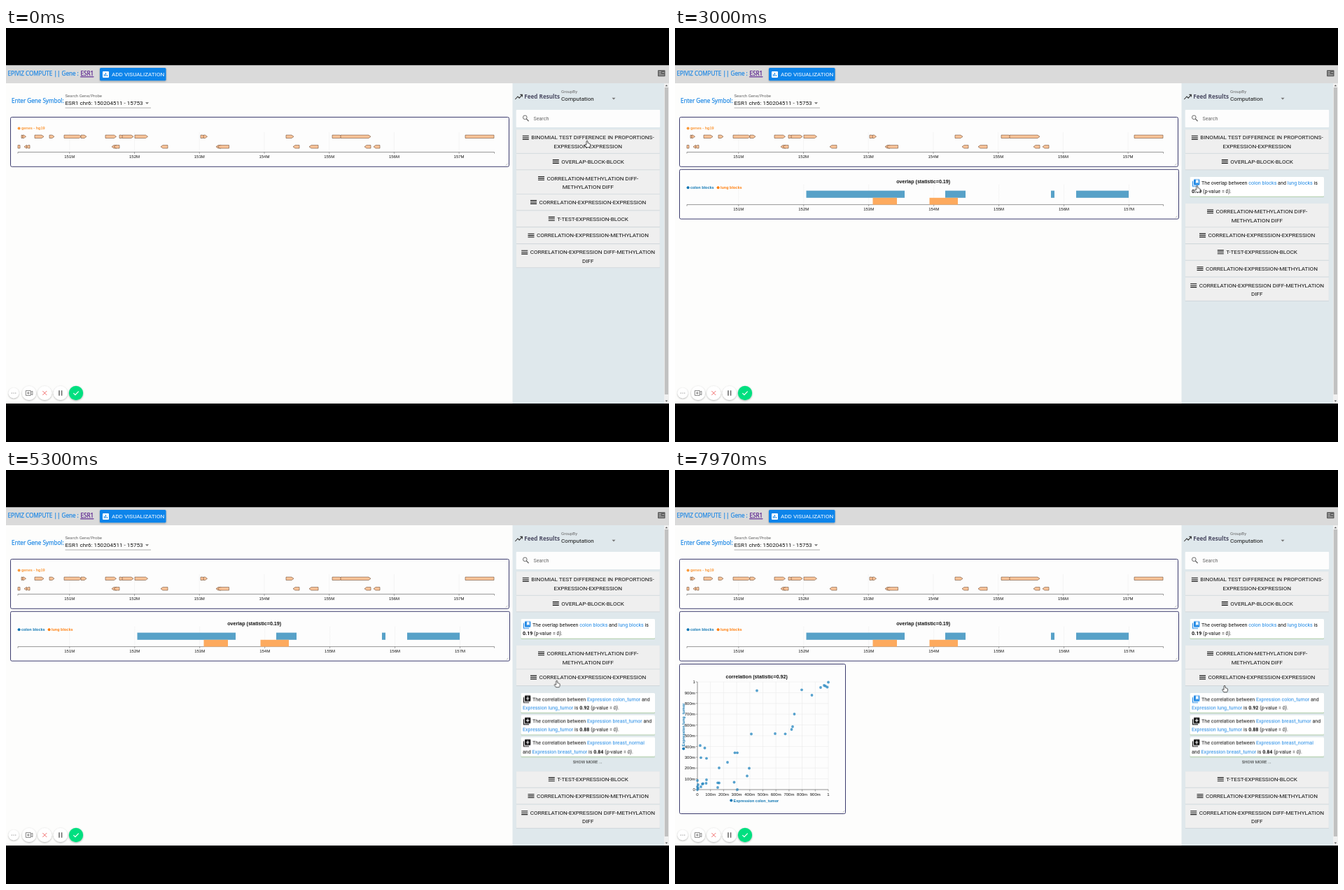
Recreate the animation shown at these times as an HTML page. Size 947 by 592 pixels, loop 8000 ms.

```html
<!DOCTYPE html>
<html lang="en">
<head>
<meta charset="utf-8">
<title>Gene feed results</title>
<style>
html, body { margin: 0; width: 100%; height: 100%; overflow: hidden; background: #000; }
svg { display: block; width: 100vw; height: 100vh; }
text { font-family: Roboto, sans-serif; font-size: 8.12px; fill: #111; white-space: pre; }
.small { font-size: 6.08px; fill: #666; }
.body { font-size: 7.11px; }
.head { font-family: "Open Sans", sans-serif; fill: #1e88e5; stroke: #1e88e5; stroke-width: .25px; }
.plot { font-family: "Liberation Sans", Arial, sans-serif; font-size: 6px; }
.title { font-size: 7.11px; font-weight: bold; }
.legend { font-size: 5.52px; font-weight: bold; }
.mid { text-anchor: middle; }
.end { text-anchor: end; }
.link { fill: #1e88e5; }
.b { font-weight: bold; }
.i { font-style: italic; }
.frame { fill: #fdfdfd; stroke: #3c3c6e; }

.shift1, .shift2, .open1, .open2, .ripple, .show1, .hide1, .show2, .hide2, #hand {
  animation-duration: 8s; animation-iteration-count: infinite; }
.shift1, .shift2, .open1, .open2 { animation-timing-function: ease; }
.show1, .hide1, .show2, .hide2 { animation-timing-function: step-end; }
.shift1 { animation-name: shift1; }
.shift2 { animation-name: shift2; }
.open1 { animation-name: open1; transform-origin: 0 203px; }
.open2 { animation-name: open2; transform-origin: 0 260.5px; }
.show1 { animation-name: show1; }
.hide1 { animation-name: hide1; }
.show2 { animation-name: show2; }
.hide2 { animation-name: hide2; }
#rip1 { animation-name: rip1; }
#rip2 { animation-name: rip2; }
#hand { animation-name: hand; animation-timing-function: ease-in-out; }

@keyframes shift1 { 0%, 13.7% { transform: translateY(0); } 17.45%, 100% { transform: translateY(47.5px); } }
@keyframes open1 { 0%, 13.7% { transform: scaleY(0); } 17.45%, 100% { transform: scaleY(1); } }
@keyframes shift2 { 0%, 56.61% { transform: translateY(0); } 60.36%, 100% { transform: translateY(122px); } }
@keyframes open2 { 0%, 56.61% { transform: scaleY(0); } 60.36%, 100% { transform: scaleY(1); } }
@keyframes show1 { 0% { opacity: 0; } 32.5%, 100% { opacity: 1; } }
@keyframes hide1 { 0% { opacity: 1; } 32.5%, 100% { opacity: 0; } }
@keyframes show2 { 0% { opacity: 0; } 85%, 100% { opacity: 1; } }
@keyframes hide2 { 0% { opacity: 1; } 85%, 100% { opacity: 0; } }
@keyframes rip1 {
  0%, 11.9% { transform: scale(0); opacity: .25; }
  14.1%, 14.7% { transform: scale(1); opacity: .25; }
  18.7%, 100% { transform: scale(1); opacity: 0; }
}
@keyframes rip2 {
  0%, 55.4% { transform: scale(0); opacity: .25; }
  57.8%, 58.4% { transform: scale(1); opacity: .25; }
  62.4%, 100% { transform: scale(1); opacity: 0; }
}
@keyframes hand {
  0%, 5% { transform: translate(830px, 161px); }
  10%, 18.75% { transform: translate(840px, 189px); }
  26.25%, 36.25% { transform: translate(745px, 225px); }
  43.5%, 46.25% { transform: translate(756px, 228px); }
  54.4%, 61.9% { transform: translate(803px, 292px); }
  73.75%, 87.5% { transform: translate(745px, 323.5px); }
  97.5%, 100% { transform: translate(785px, 308px); }
}
</style>
</head>
<body>
<svg viewBox="0 0 947 592">
  <defs>
    <clipPath id="clip1"><rect class="open1" x="725" y="203" width="212" height="47.5"/></clipPath>
    <clipPath id="clip2"><rect class="open2" x="725" y="260.5" width="212" height="122"/></clipPath>
    <clipPath id="btn1"><rect x="729" y="180" width="205" height="23"/></clipPath>
    <clipPath id="btn2"><rect x="729" y="238" width="205" height="23"/></clipPath>
    <filter id="soft" x="-30%" y="-30%" width="160%" height="170%">
      <feDropShadow dx="0" dy=".8" stdDeviation=".9" flood-opacity=".35"/>
    </filter>
  </defs>

  <rect width="947" height="592"/>
  <rect y="53.5" width="947" height="483.5" fill="#fdfdfc"/>
  <rect y="53.5" width="947" height="25.5" fill="#dadada"/>

  <!-- header -->
  <text class="head" x="2.5" y="68.4">EPIVIZ COMPUTE || Gene : </text>
  <text class="head" x="106.5" y="68.4" style="fill:#551a8b;stroke:#551a8b" text-decoration="underline">ESR1</text>
  <rect x="134" y="57" width="94.5" height="18.3" rx="1.5" fill="#0b84ea" filter="url(#soft)"/>
  <rect x="138" y="62" width="9" height="9" rx="1" fill="#fff"/>
  <path d="M140.4 69v-3M142.5 69v-5M144.6 69v-1.8" stroke="#0b84ea" stroke-width="1.1"/>
  <text x="151" y="68.8" style="fill:#fff">ADD VISUALIZATION</text>
  <rect x="931" y="60.3" width="10.5" height="9" rx=".8" fill="#5c5c5c"/>
  <path d="M932.3 62.6h3.6M932.3 64.8h3.6M932.3 67h7.8M937.2 63.7h3" stroke="#ccc" stroke-width=".9"/>

  <!-- gene search -->
  <text class="head" x="8" y="107">Enter Gene Symbol:</text>
  <text class="small" x="84.5" y="98.6">Search Gene/Probe</text>
  <text x="84.5" y="109.8">ESR1 chr6: 150204511 - 15753</text>
  <path d="M84.5 114.2h122.5M793 107.6h81" stroke="#777" stroke-width=".6"/>
  <path d="M199 106.3h5l-2.5 2.6z" fill="#777"/>

  <g id="genes"></g>
  <g id="overlap" class="show1"></g>
  <g id="scatter" class="show2"></g>

  <!-- recorder controls -->
  <g filter="url(#soft)" fill="#fff">
    <circle cx="11" cy="522" r="7.3"/><circle cx="33" cy="522" r="10"/><circle cx="55.3" cy="522" r="10"/>
    <circle cx="77.8" cy="522" r="10"/><circle cx="100" cy="522" r="10.2" fill="#00df80"/>
  </g>
  <g fill="none" stroke="#666">
    <path d="M8.3 522h.1M11 522h.1M13.7 522h.1" stroke-width="1.1" stroke-linecap="round"/>
    <path d="M28.3 518.6h7v6.8h-7zM35.3 521l2.6-1.7v5.4l-2.6-1.7M30 522h3.6M31.8 520.2v3.6" stroke-width=".8"/>
    <path d="M52.3 519l6 6m0-6l-6 6" stroke="#f06060" stroke-width=".9"/>
    <path d="M76 518.3v7.4M79.6 518.3v7.4" stroke-width="1.5"/>
    <path d="M96.4 522.2l2.5 2.5 4.8-5" stroke="#fff" stroke-width="1.2"/>
  </g>

  <!-- side panel -->
  <rect x="723.5" y="79" width="216.5" height="458" fill="#dfe8ec"/>
  <rect x="940" y="79" width="7" height="458" fill="#f0f0f0"/>
  <rect x="940.8" y="85" width="5.2" height="439" fill="#c1c1c1"/>
  <path d="M941.6 83.2h3.6l-1.8-2zM941.6 532.4h3.6l-1.8 2z" fill="#555"/>
  <path d="M727.3 102l3.7-4 2.2 2.2 4-4.5M734.4 95.4h3v3" fill="none" stroke="#333" stroke-width="1.1"/>
  <text class="head b" x="740.3" y="100.8" style="fill:#4b4b63;stroke:none">Feed Results</text>
  <text class="small" x="793" y="92.6">GroupBy</text>
  <text x="793" y="103.8">Computation</text>
  <path d="M865.5 99.8h5l-2.5 2.6z" fill="#777"/>
  <rect x="728.7" y="117" width="205.5" height="25" rx="1" fill="#fdfdfd"/>
  <circle cx="741.3" cy="127.8" r="2.8" fill="none" stroke="#666"/>
  <path d="M743.4 130l3.2 3.2" stroke="#666" stroke-width="1.3"/>
  <text class="body" x="753.5" y="131.7" style="fill:#666">Search</text>
  <g id="feed"></g>

  <g id="hand">
    <path d="M-1 .9Q0-.6 1 .9V3.6Q2 3 2.5 4 3.6 3.6 3.7 4.7 4.6 4.6 4.5 5.6V7.3L3.5 9.7H-1.2L-3.4 6.3Q-3.2 5-1.9 5.6L-1 6.4Z" fill="#fff" stroke="#222" stroke-width=".75"/>
  </g>
</svg>
<script>
const $ = id => document.getElementById(id);
const NS = 'http://www.w3.org/2000/svg';

function add(parent, tag, attrs = {}, content = '') {
  const node = document.createElementNS(NS, tag);
  for (const key in attrs) node.setAttribute(key, attrs[key]);
  if (content) node.innerHTML = content;
  parent.append(node);
  return node;
}
const label = (parent, x, y, content, cls = '') => add(parent, 'text', { x, y, class: cls }, content);
const box = (parent, x, y, width, height, attrs) => add(parent, 'rect', { x, y, width, height, ...attrs });
const path = (parent, d, stroke, width = 1, attrs = {}) =>
  add(parent, 'path', { d, fill: 'none', stroke, 'stroke-width': width, ...attrs });

function legend(parent, x, y, text, color) {
  add(parent, 'circle', { cx: x, cy: y - 2, r: 2, fill: color });
  label(parent, x + 3.3, y, text, 'plot legend').style.fill = color;
}

function track(parent, width, top, axisY, step) {
  box(parent, 6.5, top, width, 70.8, { rx: 2, class: 'frame' });
  path(parent, `M${width + 2} ${top + 69}l2.8-2.8`, '#888', .6);
  for (let i = 0; i < 7; i++) {
    const x = 90.8 + i * step;
    path(parent, `M${x} ${top + 22}V${axisY}`, '#e2e2e2', .6, { 'stroke-dasharray': '1 1' });
    path(parent, `M${x} ${axisY}v2.5`, '#555', .5);
    label(parent, x, axisY + 8.8, 151 + i + 'M', 'plot mid');
  }
  path(parent, `M17 ${axisY + 2}V${axisY}H697.5v2`, '#555', .6);
}

// Gene track: [start, end] in pixels, arrow tip on the strand's side
const genes = $('genes');
track(genes, 712, 127.5, 177.5, 92.72);
legend(genes, 18.6, 145.4, 'genes - hg19', '#fb9a3c');
const forward = [[22, 26], [24, 28.5], [41, 54], [62, 69], [83, 107.5], [107, 115], [142, 157.5], [162, 168],
  [166, 182], [184, 202.5], [278, 284], [282, 287.5], [400, 411], [466, 480], [478, 521]];
const reverse = [[26, 30], [29, 34], [151, 158], [154, 162], [221, 231], [300, 307], [302.5, 318.5],
  [410, 419], [433, 446], [512, 521], [525, 534]];
const geneStyle = { fill: '#ffc193', 'fill-opacity': .95 };
const arrow = (from, to, y) => {
  const neck = to - Math.sign(to - from) * 3;
  path(genes, `M${from} ${y - 2.2}H${neck}L${to} ${y}L${neck} ${y + 2.2}H${from}Z`, '#6b4d38', .6, geneStyle);
};
forward.forEach(([a, b]) => arrow(a, b, 155.3));
reverse.forEach(([a, b]) => arrow(b, a, 169.8));
path(genes, 'M656 153.1h41v4.4h-41zM17 167.6h3v4.4h-3z', '#6b4d38', .6, geneStyle);

// Overlap track
const overlap = $('overlap');
track(overlap, 713, 202.3, 252.6, 92.95);
label(overlap, 354.7, 222.2, 'overlap (statistic=0.19)', 'plot title mid');
legend(overlap, 18.6, 230.2, 'colon blocks', '#1278b4');
legend(overlap, 61.6, 230.2, 'lung blocks', '#ff7f0e');
[[187.5, 328], [386, 415], [537, 542], [573, 648]].forEach(([a, b]) =>
  box(overlap, a, 232.6, b - a, 10.2, { fill: '#57a1c8' }));
[[282.5, 317], [363.5, 404]].forEach(([a, b]) =>
  box(overlap, a, 242.8, b - a, 9.8, { fill: '#fdaa5e' }));

// Correlation scatter
const scatter = $('scatter');
box(scatter, 6.5, 277.5, 237, 214, { rx: 2, class: 'frame' });
path(scatter, 'M239.5 490l2.8-2.8', '#888', .6);
label(scatter, 116.7, 298, 'correlation (statistic=0.92)', 'plot title mid');
for (let i = 0; i <= 10; i++) {
  const x = 32 + i * 18.7, y = 457 - i * 15.4;
  const name = i === 10 ? '1' : i ? i + '00m' : '0';
  path(scatter, `M${x} 303V457M32 ${y}H219`, '#e6e6e6', .5);
  path(scatter, `M${x} 457v2.5M32 ${y}h-2.5`, '#555', .5);
  label(scatter, x, 466, name, 'plot mid');
  label(scatter, 28.8, y + 2.1, name, 'plot end');
}
path(scatter, 'M32 303V457H219', '#555', .6);
legend(scatter, 80.3, 474.6, 'Expression colon_tumor', '#1278b4');
legend(add(scatter, 'g', { transform: 'translate(14.2 398.5) rotate(-90)' }), 0, 0, 'Expression lung_tumor', '#1278b4');
const points = [[219, 303.5], [213, 308], [217.5, 310.5], [208, 311], [215, 309], [181, 314.3], [195.5, 322],
  [117, 315.5], [170.5, 349], [168, 367], [166.5, 371], [157.5, 377.3], [143, 377], [109, 377.5], [36, 394],
  [42.5, 397.5], [37, 411.3], [45, 412.3], [85.5, 404.3], [89, 404.3], [75, 418], [63, 426], [106, 426.5],
  [103, 437.5], [45, 443], [44.5, 448], [61, 447.3], [63, 447.5], [61, 454], [84.5, 446.5], [89, 457],
  [39, 449], [37, 453], [40, 448.5], [32, 444], [33, 450], [32, 453], [33, 455], [32, 457]];
points.forEach(([cx, cy]) => add(scatter, 'circle', { cx, cy, r: 1.9, fill: '#1f83bd', 'fill-opacity': .75 }));

// Feed list
const feed = $('feed');
function item(parent, top, height, x, first, second) {
  box(parent, 728.8, top + .4, 205, height, { fill: '#c9d0d4' });
  box(parent, 728.8, top, 205, height - .3, { fill: '#efefef' });
  const y = top + (second ? 14.2 : 13.9);
  path(parent, [-5.1, -2.7, -.3].map(dy => `M${x - 12.5} ${y + dy}h9`).join(''), '#111', 1.1);
  label(parent, x, y, first);
  if (second) label(parent, 831.3, y + 12.4, second, 'mid');
}

function ripple(parent, id, clip, x, y) {
  const holder = add(parent, 'g', { 'clip-path': `url(#${clip})` });
  add(holder, 'circle', { id, class: 'ripple', cx: x, cy: y, r: 126, style: `transform-origin:${x}px ${y}px` });
}

function icon(parent, y, color, mark, cls) {
  const g = add(parent, 'g', { transform: `translate(744 ${y})`, class: cls });
  path(g, 'M-4.5-2.8v7.6h7.6', color, 1.1);
  box(g, -3, -5.2, 8.3, 8.3, { rx: .8, fill: color });
  path(g, mark, '#fff', 1.1, mark.endsWith('z') ? { fill: '#fff', 'stroke-width': .3 } : {});
}

function card(parent, top, lines, step = '') {
  box(parent, 735.5, top + .8, 191.5, 28.3, { rx: 1.5, fill: '#b9d3b5' });
  box(parent, 735.5, top, 191.5, 27.7, { rx: 1.5, fill: '#fff' });
  icon(parent, top + 8.6, '#111', 'M-1.2-1h4.8M1.2-3.4v4.8', step && 'hide' + step);
  if (step) icon(parent, top + 8.6, '#1e88e5', 'M0-4.2h3.6v4.6l-1.8-1.2l-1.8 1.2z', 'show' + step);
  label(parent, 752, top + 11, lines[0], 'body');
  label(parent, 738, top + 23.3, lines[1], 'body');
}
const span = (cls, text) => `<tspan class="${cls}">${text}</tspan>`;
const link = text => span('link', text);
const score = value => `${span('b', value)} (p-value = ${span('i', '0)')}.`;

item(feed, 145.2, 34, 750.3, 'BINOMIAL TEST DIFFERENCE IN PROPORTIONS-', 'EXPRESSION-EXPRESSION');
item(feed, 179.8, 23, 793.3, 'OVERLAP-BLOCK-BLOCK');
ripple(feed, 'rip1', 'btn1', 840, 190);
const overlapCards = add(feed, 'g', { 'clip-path': 'url(#clip1)' });
card(overlapCards, 213, [
  `The overlap between ${link('colon blocks')} and ${link('lung blocks')} is`, score('0.19')], 1);

const lower = add(feed, 'g', { class: 'shift1' });
item(lower, 203.4, 34, 772.5, 'CORRELATION-METHYLATION DIFF-', 'METHYLATION DIFF');
item(lower, 237.8, 23, 761.5, 'CORRELATION-EXPRESSION-EXPRESSION');
ripple(lower, 'rip2', 'btn2', 803, 248.5);
const pairCards = add(lower, 'g', { 'clip-path': 'url(#clip2)' });
const intro = 'The correlation between ';
card(pairCards, 271.6, [
  `${intro}${link('Expression colon_tumor')} and`, `${link('Expression lung_tumor')} is ${score('0.92')}`], 2);
card(pairCards, 303, [
  `${intro}${link('Expression breast_tumor')} and`, `${link('Expression lung_tumor')} is ${score('0.88')}`]);
card(pairCards, 334.4, [
  `${intro}${link('Expression breast_normal')}`, `and ${link('Expression breast_tumor')} is ${score('0.84')}`]);
label(pairCards, 830.7, 372.3, 'SHOW MORE ...', 'small mid').style.fill = '#222';

const bottom = add(lower, 'g', { class: 'shift2' });
item(bottom, 261.6, 23, 787.3, 'T-TEST-EXPRESSION-BLOCK');
item(bottom, 285.4, 23, 758, 'CORRELATION-EXPRESSION-METHYLATION');
item(bottom, 309.2, 33.5, 748.7, 'CORRELATION-EXPRESSION DIFF-METHYLATION', 'DIFF');
</script>
</body>
</html>
```
